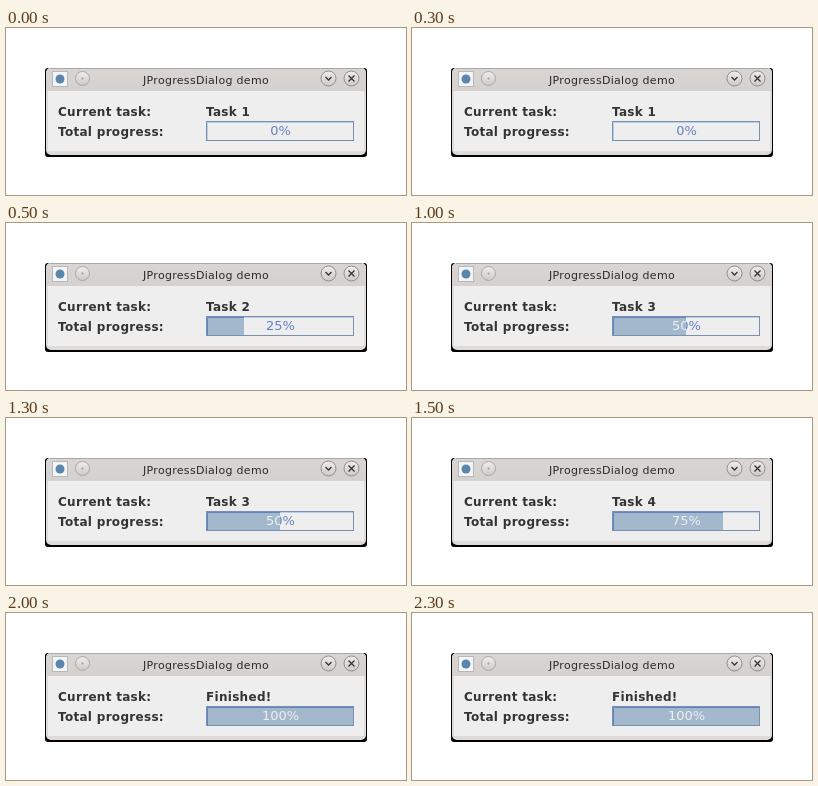
An HTML page for the animation above (2500 ms loop, 400x167 px).

```html
<!DOCTYPE html>
<html>
<head>
<meta charset="utf-8">
<style>
  html, body { margin: 0; width: 100%; height: 100%; overflow: hidden; background: #fff; }
  svg { display: block; }
  text { font: bold 12px "DejaVu Sans", sans-serif; letter-spacing: .3px; fill: #333; }
  .title { font: 11px "DejaVu Sans", sans-serif; fill: #2b2928; text-anchor: middle; }
  .percent { font: 13px "DejaVu Sans", sans-serif; letter-spacing: 0; text-anchor: middle; }
  .button { fill: url(#knob); stroke: #8f8c89; }
  .sign { fill: none; stroke: #333; stroke-width: 1.3; }
</style>
</head>
<body>
<svg width="400" height="167" viewBox="0 0 400 167">
  <defs>
    <linearGradient id="bar" x2="0" y2="1">
      <stop stop-color="#d9d5d2"/><stop offset="1" stop-color="#d5d1ce"/>
    </linearGradient>
    <linearGradient id="knob" x2="0" y2="1">
      <stop stop-color="#f0eeec"/><stop offset="1" stop-color="#cdc9c6"/>
    </linearGradient>
    <clipPath id="done"><rect id="doneArea" x="201" y="93" height="20"/></clipPath>
    <clipPath id="rest"><rect id="restArea" y="93" height="20"/></clipPath>
  </defs>

  <!-- Window -->
  <rect x="39" y="40" width="322" height="89" rx="3"/>
  <rect x="40" y="40" width="320" height="87" rx="5" fill="#dedbd9"/>
  <path d="M40 63V45q0-5 5-5H355q5 0 5 5V63z" fill="url(#bar)"/>
  <path d="M44 40.5H356" stroke="#aaa7a5"/>
  <rect x="42" y="63" width="316" height="60" fill="#eee"/>

  <!-- Title bar -->
  <rect x="46.5" y="43.5" width="15" height="15" fill="#f5f5f5" stroke="#b5b9bd"/>
  <circle cx="54" cy="51" r="4.5" fill="#5b86ab"/>
  <circle class="button" cx="76.5" cy="50.5" r="7" style="stroke: #aaa7a4"/>
  <circle cx="76.5" cy="50.5" r="1" fill="#999"/>
  <circle class="button" cx="322.5" cy="50.5" r="7.5"/>
  <path class="sign" d="M319.5 49l3 3 3-3"/>
  <circle class="button" cx="345.5" cy="50.5" r="7.5"/>
  <path class="sign" d="M342.5 47.5l6 6m0-6l-6 6"/>
  <text class="title" x="200" y="56" letter-spacing=".3">JProgressDialog demo</text>

  <!-- Content -->
  <text x="52" y="88">Current task:</text>
  <text x="52" y="108">Total progress:</text>
  <text id="task" x="200" y="88"></text>
  <path d="M201.5 112V94.5H347" fill="none" stroke="#b8cfe5"/>
  <rect id="fill" x="201" y="94" height="18" fill="#a3b8cc"/>
  <path id="shade" fill="none" stroke="#6382bf"/>
  <rect x="200.5" y="93.5" width="147" height="19" fill="none" stroke="#7a90b0"/>
  <text class="percent" x="274.5" y="107" clip-path="url(#rest)" style="fill: #6382bf"></text>
  <text class="percent" x="274.5" y="107" clip-path="url(#done)" style="fill: #eee"></text>
</svg>
<script>
  const STEP = 500, STEPS = 5, INNER = 146, LEFT = 201;
  const get = id => document.getElementById(id);
  const labels = document.querySelectorAll('.percent');

  function draw(now) {
    const step = Math.floor(now / STEP) % STEPS;
    const width = Math.round(INNER * step / 4);
    get('task').textContent = step < 4 ? `Task ${step + 1}` : 'Finished!';
    for (const label of labels) label.textContent = `${step * 25}%`;
    for (const id of ['fill', 'doneArea']) get(id).setAttribute('width', width);
    get('restArea').setAttribute('x', LEFT + width);
    get('restArea').setAttribute('width', INNER - width);
    get('shade').setAttribute('d', width ? `M201.5 112V94.5H${LEFT + width}` : '');
  }

  const start = performance.now();
  function tick() {
    draw(performance.now() - start);
    requestAnimationFrame(tick);
  }
  tick();
</script>
</body>
</html>
```
